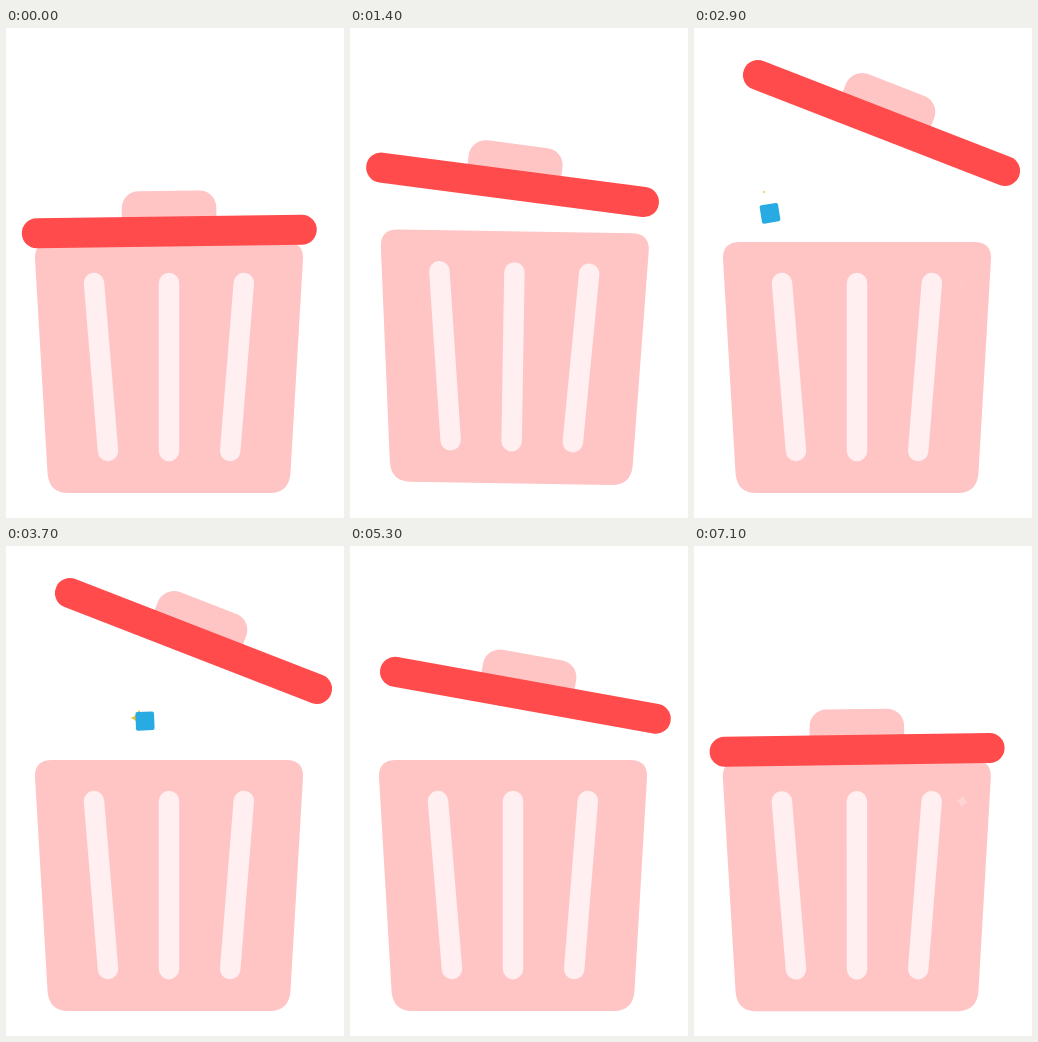
Animation, 338 px wide and 490 px high, one loop 7.2 s. Source, as an HTML page:

```html
<!DOCTYPE html>
<html lang="en">
<head>
<meta charset="utf-8">
<title>Trash bin</title>
<style>
  html, body { margin: 0; height: 100%; overflow: hidden; background: #fff; }
  svg { display: block; width: 100vw; height: 100vh; }
  .pale { fill: #ffc4c4; }
  .slots { stroke: #ffeff0; stroke-width: 20.5; stroke-linecap: round; }
</style>
</head>
<body>
<svg viewBox="0 0 338 490">
  <defs>
    <path id="star" d="M0-10.5Q2.6-2.6 10.5 0Q2.6 2.6 0 10.5Q-2.6 2.6-10.5 0Q-2.6-2.6 0-10.5Z"/>
  </defs>
  <g id="items"></g>
  <g id="bin">
    <g transform="translate(-163 -339.5)">
      <path class="pale" d="M46 214H280Q297.5 214 297 231L284.4 446Q282.5 465 264 465H62Q43.5 465 41.6 446L29 231Q28.5 214 46 214Z"/>
      <path class="slots" d="M88 255L102 423M163 255V423M237.8 255L224.2 423"/>
      <use id="glint" href="#star" fill="#fff"/>
      <g id="lid">
        <rect class="pale" x="-47.3" y="-40.7" width="94.6" height="50" rx="17"/>
        <rect x="-147.5" y="-15" width="295" height="30" rx="15" fill="#ff4b4b"/>
      </g>
    </g>
  </g>
</svg>
<script>
const LOOP = 7200, STEP = 100, HOPS = 3, HOPS_END = 4500;
const $ = id => document.getElementById(id);
const clamp = p => Math.min(1, Math.max(0, p));
const arch = p => Math.sin(Math.PI * clamp(p));

// Eased 0 to 1 between two times; and up to a peak and back down.
const ramp = (t, from, to) => (1 - Math.cos(Math.PI * clamp((t - from) / (to - from)))) / 2;
const pulse = (t, from, peak, to) => ramp(t, from, peak) - ramp(t, peak, to);

function move(el, x, y, turn, sx = 1, sy = sx) {
  el.setAttribute('transform', `translate(${x} ${y}) rotate(${turn}) scale(${sx} ${sy})`);
}

function drawBin(t) {
  const squash = pulse(t, 0, 830, 1900);
  const jump = pulse(t, 830, 1900, 2800);
  const tilt = pulse(t, 5300, 5930, LOOP);
  move($('bin'),
    163 - 5.2 * tilt,
    339.5 + 10.5 * squash - 27 * jump + 18.2 * tilt,
    1.7 * jump - 3 * tilt,
    1, 1 + .037 * (jump - squash - tilt));
}

// The lid lifts most of the way, then swings out; it closes in one move.
function drawLid(t) {
  const lift = ramp(t, 1000, 1900), swing = ramp(t, 1900, 2300);
  const left = 1 - ramp(t, 4800, 5800);
  const open = (.8 * lift + .2 * swing) * left;
  move($('lid'),
    163.3 + (3 * lift + 21.2 * swing) * left - 5 * arch(lift),
    203.5 - 108.5 * open,
    21.95 * open - .75);
}

function drawGlint(t) {
  const late = t > LOOP / 2;
  const glow = late ? pulse(t, 5400, 5850, 8000) : pulse(t, 1500, 1850, 3200);
  move($('glint'), 268.3, 255, 45 + .038 * (t - (late ? 5700 : 1850)), Math.sqrt(glow));
  $('glint').setAttribute('opacity', .7 * glow);
}

// Pieces hop above the rim from left to right, each with a small star.
function drawHop(g, i, t) {
  const start = 2700 + 650 * i, x = 76 + 63 * i, rise = 66 - 8 * i;
  const p = (t - start) / Math.min(800, HOPS_END - start);
  g.setAttribute('visibility', p > 0 && p < 1 ? 'visible' : 'hidden');
  move(g.children[0], x - 6, 230 - rise, 0, .9 * arch((p - .22) / .63));
  move(g.children[1], x, 232 - rise * arch(p), 36 * p - 18);
}

$('items').innerHTML = (
  '<g><use href="#star" fill="#ecc030"/>' +
  '<rect x="-9.3" y="-9.3" width="18.6" height="18.6" rx="2" fill="#28aae2"/></g>'
).repeat(HOPS);
const hops = [...$('items').children];

function tick() {
  const t = Math.floor(performance.now() % LOOP / STEP) * STEP;
  drawBin(t);
  drawLid(t);
  drawGlint(t);
  hops.forEach((g, i) => drawHop(g, i, t));
  requestAnimationFrame(tick);
}
tick();
</script>
</body>
</html>
```
